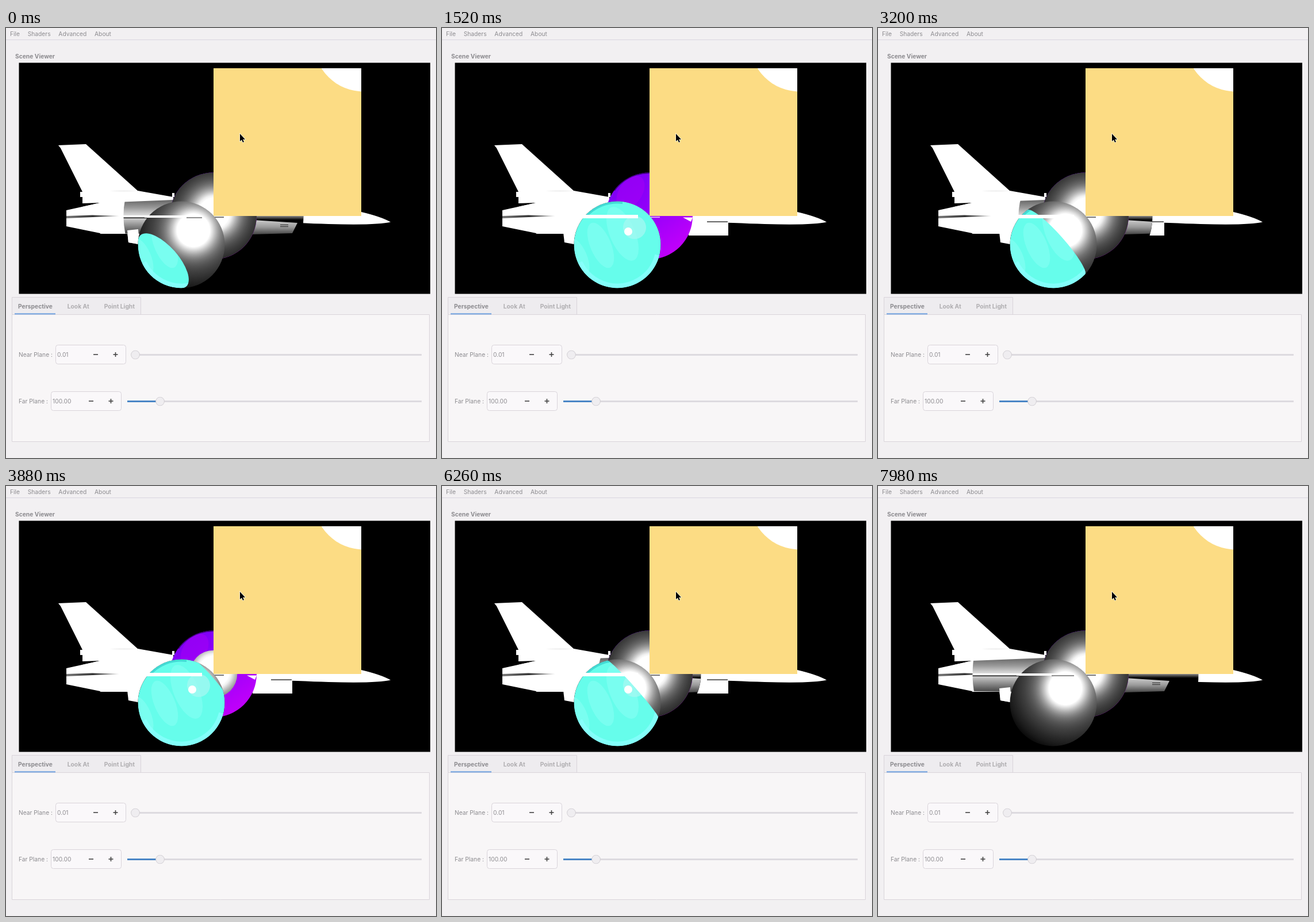
Recreate the animation shown at these times as an HTML page with a canvas. Size 748 by 748 pixels, loop 8000 ms.

```html
<!DOCTYPE html>
<html lang="en">
<head>
<meta charset="utf-8">
<title>Scene Viewer</title>
<style>
html, body { margin: 0; width: 100%; height: 100%; overflow: hidden; background: #f2f0f2; }
canvas { display: block; width: 748px; height: 748px; }
</style>
</head>
<body>
<canvas id="stage" width="748" height="748"></canvas>
<script>
const ctx = document.getElementById('stage').getContext('2d');
const TAU = Math.PI * 2;
const LOOP = 8000, CYCLE = 2800, FIRST = 1780, RUN = 740, STEP = 840;
const light = { x: 361, y: 327 };
const back = { x: 360.5, y: 327, r: 75.5 };
const front = { x: 305, y: 377, r: 75.5 };
const AXIS = Math.atan2(front.y - light.y, front.x - light.x);

// The light radius shrinks through each cycle; every run ends in a short stall.
function radiusAt(t) {
  const start = t < FIRST ? FIRST - CYCLE : FIRST + Math.floor((t - FIRST) / CYCLE) * CYCLE;
  const anchor = t < FIRST ? 100 : start;
  const run = anchor + Math.floor((t - anchor) / STEP) * STEP;
  const p = Math.max(0, Math.min(t, run + RUN)) - start;
  return Math.max(0, 250 - 0.0855 * p - 5.9e-6 * p * p);
}

function poly(fill, ...pts) {
  ctx.fillStyle = fill;
  ctx.beginPath();
  pts.forEach(([x, y]) => ctx.lineTo(x, y));
  ctx.fill();
}
function rect(fill, x, y, w, h) {
  ctx.fillStyle = fill;
  ctx.fillRect(x, y, w, h);
}
function oval(fill, x, y, rx, ry = rx, rot = 0) {
  ctx.fillStyle = fill;
  ctx.beginPath();
  ctx.ellipse(x, y, rx, ry, rot, 0, TAU);
  ctx.fill();
}
function rim(color, width, s, from, to) {
  ctx.strokeStyle = color;
  ctx.lineWidth = width;
  ctx.beginPath();
  ctx.arc(s.x, s.y, s.r, from, to);
  ctx.stroke();
}
function clipped(path, draw) {
  ctx.save();
  ctx.beginPath();
  path();
  ctx.clip();
  draw();
  ctx.restore();
}
const disc = (s, r = s.r) => ctx.arc(s.x, s.y, r, 0, TAU);

function fade(x0, y0, x1, y1, ...colors) {
  const g = ctx.createLinearGradient(x0, y0, x1, y1);
  colors.forEach((c, i) => g.addColorStop(i / (colors.length - 1), c));
  return g;
}

// Diffuse falloff plus a broad highlight around (x, y).
function shading(x, y, reach) {
  const g = ctx.createRadialGradient(x, y, 0, x, y, reach);
  for (let i = 0; i <= 24; i++) {
    const d = i / 24 * reach;
    const lum = 0.6 * (1 - d / reach) ** 0.9 + 0.9 * Math.exp(-((d / 38) ** 2.5));
    const v = Math.round(255 * Math.min(1, lum));
    g.addColorStop(i / 24, `rgb(${v},${v},${v})`);
  }
  return g;
}

function whitePlane() {
  const w = '#fff';
  poly(w, [91, 204], [139, 202], [229, 283], [133, 285], [95, 209]);
  poly(w, [133, 284], [229, 283], [291, 294], [291, 330], [133, 330]);
  poly('#000', [133, 305], [164, 304], [133, 311]);
  poly(w, [105, 317], [164, 304], [164, 357], [105, 345]);
  rect(w, 129, 285, 5, 9);
  rect(w, 289, 287, 4, 7);
  rect(w, 164, 304, 90, 54);
  poly(w, [211, 356], [245, 356], [240, 378], [213, 373]);
  rect(w, 429, 336, 69, 25);
  ctx.beginPath();
  ctx.moveTo(419, 327);
  ctx.lineTo(618, 320);
  ctx.quadraticCurveTo(652, 328, 669, 337.5);
  ctx.quadraticCurveTo(640, 345, 507, 339);
  ctx.lineTo(432, 337);
  ctx.fillStyle = w;
  ctx.fill();
  poly(fade(105, 0, 198, 0, '#777', '#333', '#aaa'), [105, 327], [150, 325.5], [197, 327], [105, 331]);
  rect('#000', 461, 336.5, 36, 1.2);
}

function greyPlane() {
  poly(fade(0, 299, 0, 326, '#666', '#999', '#ddd'), [105, 317], [164, 304], [291, 299], [300, 326], [105, 326]);
  rect('#fff', 105, 326, 145, 3.5);
  rect('#111', 105, 329.5, 145, 1.5);
  poly(fade(0, 331, 0, 358, '#ccc', '#888', '#444'), [105, 331], [250, 331], [250, 358], [168, 357], [105, 345]);
  poly('#fff', [211, 352], [230, 350], [232, 376], [213, 373]);
  rect(fade(0, 327, 0, 334, '#888', '#000'), 395, 327, 223, 36);
  poly(fade(0, 334, 0, 359, '#ccc', '#999', '#444'), [430, 334], [507, 339], [498, 357], [429, 359]);
  rect('#222', 477, 342, 14, 1);
  rect('#222', 477, 345, 14, 1);
}

function backSphere(r) {
  clipped(() => disc(back), () => {
    rect(fade(310, 255, 410, 400, '#7a00f5', '#9600fa', '#c800fa'), 285, 250, 152, 155);
    oval('rgba(170,0,245,.5)', 328, 286, 20, 32, 0.6);
    rim('#3c0078', 3, back, TAU * 0.6, TAU * 0.8);
    if (r > 3) {
      const reach = r > 78 ? back.r + 2 : r - 3;
      clipped(() => disc(light, reach), () => rect(shading(362, 322, 105), 280, 245, 160, 165));
    }
  });
  if (r < 72) poly('#fff', [419, 329.5], [436, 329.5], [433, 337]);
  rect(r > 20 ? '#222' : '#fff', 341, 328.5, 38, 1.2);
}

// Part of the front sphere beyond the light's reach: a spherical cap seen at a tilt.
function capPath(r) {
  const a = front.r;
  const tilt = Math.max(4, Math.min(32, (r - 90) * 0.38)) * TAU / 360;
  const cosLimb = -1.04 + 7e-5 * r * r;
  const cosCap = cosLimb * Math.cos(tilt);
  if (cosCap >= 1) return;
  if (cosLimb <= -1) {
    ctx.arc(0, 0, a, 0, TAU);
    return;
  }
  const cap = Math.acos(cosCap);
  const major = a * Math.sin(cap), minor = major * Math.sin(tilt);
  const limb = Math.acos(Math.min(1, cosLimb));
  const open = cosLimb < 1 ? Math.acos(Math.min(1, Math.max(-1, Math.tan(tilt) / Math.tan(cap)))) : 0;
  ctx.ellipse(a * cosCap * Math.cos(tilt), 0, minor, major, 0, open, TAU - open);
  if (open) ctx.arc(0, 0, a, -limb, limb);
  ctx.closePath();
}

function cyanSurface() {
  rect('#66fdeb', 228, 300, 155, 155);
  for (let i = 0; i < 3; i++) oval('rgba(150,255,248,.4)', 238 + i * 38, 398 - i * 20, 14 + i * 4, 34 + i * 8, -0.4);
  oval('rgba(165,248,242,.75)', 335, 347, 20);
  rim('rgba(140,255,255,.75)', 16, front, 0.25, 2.7);
  rim('rgba(50,200,200,.65)', 8, front, TAU * 0.61, TAU * 0.77);
  oval('#fff', 324, 354, 7);
}

function frontSphere(r) {
  oval(shading(326, 352, 114), front.x, front.y, front.r);
  ctx.save();
  ctx.translate(front.x, front.y);
  ctx.rotate(AXIS);
  ctx.beginPath();
  capPath(r);
  ctx.rotate(-AXIS);
  ctx.translate(-front.x, -front.y);
  ctx.clip();
  clipped(() => disc(front), cyanSurface);
  ctx.restore();
  const lit = r > 130;
  rect('#fff', 241, lit ? 326 : 325, 100, lit ? 4 : 6);
  if (lit) rect('#222', light.x - r * 0.3, 329.5, Math.max(0, r * 0.3 - 20), 1);
}

function square() {
  clipped(() => ctx.rect(361, 70, 257, 257), () => {
    rect('#fcdc84', 361, 70, 257, 257);
    oval('#fff', 622, 25.5, 86, 85);
  });
}

function cursor() {
  const arrow = new Path2D('M407 184v13l3-2.5 2 4.5 2-1-2-4.3h4z');
  ctx.strokeStyle = '#fff';
  ctx.lineWidth = 1.2;
  ctx.stroke(arrow);
  ctx.fillStyle = '#000';
  ctx.fill(arrow);
}

const INK = '#8c8b8f', PALE = '#b0aeb1';

function text(str, x, y, color = INK, weight = 400) {
  ctx.font = `${weight} 10.25px Inter, "Open Sans", sans-serif`;
  ctx.fillStyle = color;
  ctx.fillText(str, x, y);
  return x + ctx.measureText(str).width;
}
function box(x, y, w, h, fill, r = 0) {
  ctx.beginPath();
  ctx.roundRect(x + 0.5, y + 0.5, w, h, r);
  ctx.fillStyle = fill;
  ctx.fill();
  ctx.strokeStyle = '#d9d4da';
  ctx.lineWidth = 1;
  ctx.stroke();
}
function field(label, value, x, y) {
  text(label, 22, y + 4);
  box(x, y - 17, 122, 33, '#faf8fa', 4);
  text(value, x + 3, y + 4);
  rect('#444', x + 66, y - 0.8, 8, 1.6);
  rect('#444', x + 100.5, y - 0.8, 8, 1.6);
  rect('#444', x + 103.7, y - 4, 1.6, 8);
}
function slider(x, y, knob) {
  rect('#dddadf', x, y - 1.5, 723 - x, 3);
  if (knob - x > 10) rect('#4a86c6', x, y - 1.5, knob - x, 3);
  oval('#cfccd1', knob, y, 7.8);
  oval('#efedf0', knob, y, 6.9);
}

function chrome() {
  rect('#f2f0f2', 0, 0, 748, 748);
  ['File', 'Shaders', 'Advanced', 'About'].reduce((x, s) => text(s, x, 14) + 13.7, 7);
  rect('#d9d5e0', 0, 20, 748, 1);
  text('Scene Viewer', 16, 53, INK, 700);
  box(10, 468, 224, 30, '#eeecef');
  box(10, 498, 726, 221, '#f8f6f7');
  rect('#86aee2', 15, 496, 71, 2.5);
  ['Perspective', 'Look At', 'Point Light'].reduce((x, s, i) => text(s, x, 488, i ? PALE : INK, 700) + 26, 21);
  field('Near Plane :', '0.01', 86, 568);
  slider(218, 568.5, 225);
  field('Far Plane :', '100.00', 78, 649);
  slider(211, 649.5, 268);
}

function scene(r) {
  rect('#000', 22.5, 60.5, 715.5, 402);
  whitePlane();
  if (r > 0) clipped(() => disc(light, r), greyPlane);
  backSphere(r);
  frontSphere(r);
  square();
  cursor();
}

function frame(now) {
  chrome();
  scene(radiusAt(now % LOOP));
  requestAnimationFrame(frame);
}
requestAnimationFrame(frame);
</script>
</body>
</html>
```
